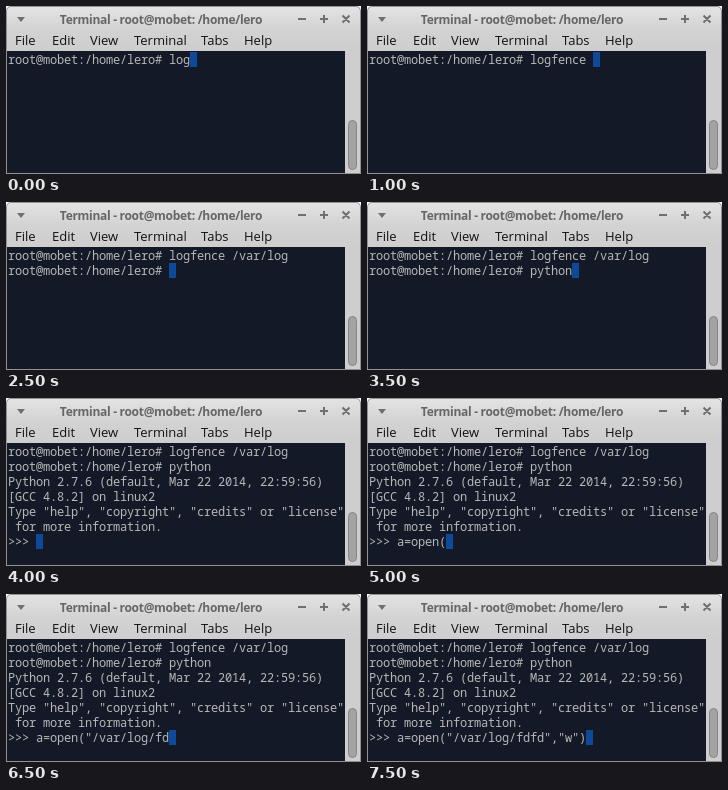
Recreate the animation shown at these times as an HTML page. Size 355 px wide and 168 px high, loop 8000 ms.

```html
<!DOCTYPE html>
<html lang="en">
<head>
<meta charset="utf-8">
<title>Terminal</title>
<style>
  html, body { margin: 0; width: 100%; height: 100%; overflow: hidden; background: #fff; }
  .window {
    position: absolute; left: 0; top: 0; width: 355px; height: 168px; overflow: hidden;
    box-sizing: border-box; background: #cecece; border-radius: 5px 5px 0 0;
  }
  .window::after {
    content: ""; position: absolute; inset: 0; border: 1px solid #929292; border-radius: 5px 5px 0 0;
  }
  .bar { position: absolute; left: 0; top: 0; width: 355px; height: 45px; background: linear-gradient(#e4e4e4, #d2d2d2 24px, #cecece); }
  svg { position: absolute; left: 0; top: 0; }
  .title { font: 700 12px "Open Sans", "Noto Sans", sans-serif; letter-spacing: -.3px; fill: #666; }
  .menu { font: 13px "Open Sans", "Noto Sans", sans-serif; fill: #111; }
  .screen {
    position: absolute; left: 1px; top: 45px; width: 338px; height: 122px; margin: 0;
    padding: 1px 0 0 1px; box-sizing: border-box; background: #131926; color: #b7b7b7;
    font: 12px/15px "Noto Sans Mono", "DejaVu Sans Mono", monospace; letter-spacing: -.2px; white-space: pre;
  }
  .cursor { display: inline-block; width: 7px; height: 15px; background: #0f4999; vertical-align: top; }
  .thumb {
    position: absolute; left: 342px; top: 114px; width: 9px; height: 50px; box-sizing: border-box;
    background: #a3a3a3; border: 1px solid #858585; border-radius: 5px;
  }
</style>
</head>
<body>
<div class="window">
  <div class="bar"></div>
  <svg width="355" height="45">
    <text class="title" x="155" y="18" text-anchor="middle">Terminal - root@mobet: /home/lero</text>
    <g class="menu">
      <text x="9" y="39">File</text>
      <text x="46" y="39">Edit</text>
      <text x="84" y="39">View</text>
      <text x="128" y="39">Terminal</text>
      <text x="195" y="39">Tabs</text>
      <text x="238" y="39">Help</text>
    </g>
    <path d="M11 11h8l-4 5z" fill="#707070"/>
    <path d="M292 13h8M314 13h8M318 9v8M336.5 9.5l7 7M343.5 9.5l-7 7" fill="none" stroke="#707070" stroke-width="2"/>
  </svg>
  <pre class="screen"><span id="text"></span><span class="cursor"></span></pre>
  <div class="thumb"></div>
</div>
<script>
  const STEP = 500, LOOP = 8000;
  const prompt = "root@mobet:/home/lero# ";
  const command = "logfence /var/log";
  const code = 'a=open("/var/log/fdfd","w")';
  const shell = prompt + command + "\n" + prompt;
  const repl = shell + `python
Python 2.7.6 (default, Mar 22 2014, 22:59:56)
[GCC 4.8.2] on linux2
Type "help", "copyright", "credits" or "license"
 for more information.
>>> `;

  // Each step shows a fixed text plus the first letters of the line being typed.
  const type = (before, line, counts) => counts.map(n => before + line.slice(0, n));
  const steps = [
    ...type(prompt, command, [3, 6, 9, 13, 17]),
    ...type(shell, "python", [0, 3, 6]),
    ...type(repl, code, [0, 3, 7, 11, 16, 19, 23, 27])
  ];

  const text = document.getElementById("text");
  const start = performance.now();
  let shown = -1;

  function draw(now) {
    const step = Math.floor(Math.max(0, now - start) % LOOP / STEP);
    if (step !== shown) text.textContent = steps[shown = step];
    requestAnimationFrame(draw);
  }
  draw(start);
</script>
</body>
</html>
```
